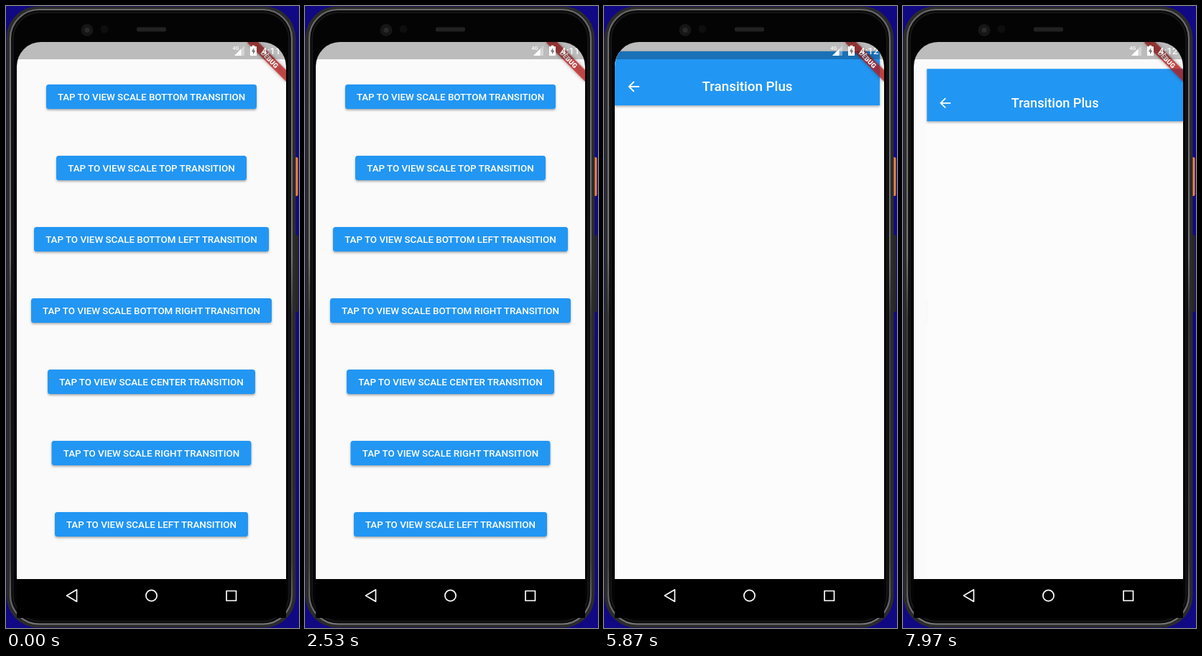
Recreate the animation shown at these times as an HTML page. Size 408 px wide and 864 px high, loop 8000 ms.

```html
<!DOCTYPE html>
<html lang="en">
<head>
<meta charset="utf-8">
<title>Scale transitions</title>
<style>
  html, body { margin: 0; width: 100%; height: 100%; overflow: hidden; background: #110884; }
  svg { display: block; width: 100vw; height: 100vh; }
  text { font-family: Roboto, sans-serif; font-weight: 500; fill: #fff; }
</style>
</head>
<body>
<svg viewBox="0 0 408 864" preserveAspectRatio="none">
  <defs>
    <clipPath id="screen"><path d="M15 796V84A34 34 0 0 1 49 50H356A34 34 0 0 1 390 84V796Z"/></clipPath>
    <linearGradient id="rim" x2="0" y2="1">
      <stop offset="0" stop-color="#6a6a6a"/>
      <stop offset=".4" stop-color="#747474"/>
      <stop offset=".5" stop-color="#3c3c3c"/>
      <stop offset=".9" stop-color="#444"/>
      <stop offset="1" stop-color="#777"/>
    </linearGradient>
    <filter id="shade" x="-10%" y="-30%" width="120%" height="180%">
      <feDropShadow dx="0" dy="1.8" stdDeviation="1.4" flood-color="#000" flood-opacity=".32"/>
    </filter>
    <filter id="glow" x="-20%" y="-80%" width="140%" height="260%">
      <feDropShadow dx="0" dy="0" stdDeviation="2.4" flood-color="#000" flood-opacity=".45"/>
    </filter>
  </defs>

  <!-- phone body -->
  <rect width="408" height="864" fill="#110884"/>
  <rect x="400" y="318" width="7" height="107" rx="2" fill="#262626"/>
  <rect x="400" y="210" width="6.5" height="54" rx="2" fill="#ee8540"/>
  <rect x=".5" y=".5" width="403" height="863" rx="44" fill="#2b2b2b"/>
  <rect x="6" y="5" width="392" height="853.5" rx="40" fill="#0b0b0b" stroke="url(#rim)" stroke-width="2.2"/>
  <rect x="10" y="9" width="384" height="845.5" rx="37" fill="#040404" stroke="#1a1a1a" stroke-width="1.5"/>
  <circle cx="113" cy="33.5" r="8.5" fill="#161616"/>
  <circle cx="113" cy="33.5" r="3.5" fill="#2a2a2a"/>
  <circle cx="137" cy="32" r="5.5" fill="#0e0e0e"/>
  <rect x="182" y="29.5" width="41" height="6" rx="2" fill="#222"/>
  <rect x="15" y="790" width="375" height="60" fill="#000"/>

  <g clip-path="url(#screen)">
    <rect x="15" y="50" width="375" height="746" fill="#fafafa"/>
    <g id="menu" font-size="13.37" text-anchor="middle"></g>

    <g id="page">
      <rect x="15" y="51" width="375" height="745" fill="#fcfcfc"/>
      <rect x="15" y="51" width="375" height="76.4" fill="#2196f3" filter="url(#shade)"/>
      <path d="M49.7 100.9H35.5M42.2 93.9L35.2 100.9L42.2 107.9" fill="none" stroke="#fff" stroke-width="1.9"/>
      <text x="202.5" y="107.5" font-size="19.1" text-anchor="middle">Transition Plus</text>
    </g>

    <g transform="translate(390 51) rotate(45)">
      <rect x="-38.2" y="26.7" width="76.4" height="11.5" fill="#b71c1c" fill-opacity=".72" filter="url(#glow)"/>
      <text y="35.8" font-size="9.4" text-anchor="middle" style="font-weight:900">DEBUG</text>
    </g>

    <!-- status bar -->
    <rect x="15" y="50" width="375" height="24" fill="#000" fill-opacity=".25"/>
    <text x="315.5" y="60.5" font-size="7">4G</text>
    <path d="M332 55V69H318Z" fill="#fff" fill-opacity=".35"/>
    <path d="M327.5 59.5V69H318Z" fill="#fff"/>
    <path d="M340 56.2H342.7V54.8H346.3V56.2H349V69H340Z" fill="#fff"/>
    <path d="M345.3 58L341.8 63.4H344V67.2L347.4 61.8H345.3Z" fill="#777"/>
    <text id="clock" x="382.5" y="67" font-size="13.4" text-anchor="end" fill-opacity=".9"></text>
  </g>

  <!-- navigation bar -->
  <g fill="none" stroke="#fff" stroke-width="1.7" stroke-linejoin="round">
    <path d="M84.5 819L98.5 810.8V827.2Z"/>
    <circle cx="202.5" cy="819" r="7.6"/>
    <rect x="307" y="812.5" width="13.5" height="13.5"/>
  </g>
</svg>
<script>
const LOOP = 8000, OPEN_MS = 1000, CLOSE_MS = 200, CLOCK_TICK = 3600;
const byId = id => document.getElementById(id);
const page = byId('page'), clock = byId('clock');

const buttons = [['BOTTOM', 293], ['TOP', 265], ['BOTTOM LEFT', 327], ['BOTTOM RIGHT', 335],
  ['CENTER', 289], ['RIGHT', 278], ['LEFT', 269]];
byId('menu').innerHTML = buttons.map(([name, w], i) => {
  const y = 109 + 99 * i;
  return `<rect x="${202.5 - w / 2}" y="${y}" width="${w}" height="34" rx="3.5" fill="#2196f3" filter="url(#shade)"/>
    <text x="202.5" y="${y + 22}">TAP TO VIEW SCALE ${name} TRANSITION</text>`;
}).join('');

// Each visit grows the page from an anchor, then shrinks it back.
const visits = [
  { open: 1046, close: 2190, x: 202.5, y: 796 },
  { open: 3240, close: 4330, x: 202.5, y: 51 },
  { open: 5409, close: 6430, x: 15, y: 796 },
  { open: 7652, close: 9000, x: 390, y: 796 }
];

const bezier = (x1, y1, x2, y2) => x => {
  if (x <= 0 || x >= 1) return Math.min(1, Math.max(0, x));
  const at = (a, b, s) => 3 * s * (1 - s) ** 2 * a + 3 * s * s * (1 - s) * b + s ** 3;
  let lo = 0, hi = 1;
  for (let i = 0; i < 24; i++) {
    const mid = (lo + hi) / 2;
    if (at(x1, x2, mid) < x) lo = mid; else hi = mid;
  }
  return at(y1, y2, lo);
};
const grow = bezier(0.18, 1, 0.04, 1);
const shrink = bezier(0.4, 0, 0.2, 1);

function draw(t) {
  const v = visits.find(v => t >= v.open && t < v.close + CLOSE_MS);
  const scale = !v ? 0
    : t < v.close ? grow((t - v.open) / OPEN_MS)
    : shrink(1 - (t - v.close) / CLOSE_MS);
  page.setAttribute('visibility', scale > 0.001 ? 'visible' : 'hidden');
  if (v) page.setAttribute('transform',
    `translate(${v.x} ${v.y}) scale(${scale}) translate(${-v.x} ${-v.y})`);
  clock.textContent = t < CLOCK_TICK ? '4:11' : '4:12';
}

const start = performance.now();
function tick() {
  draw((performance.now() - start) % LOOP);
  requestAnimationFrame(tick);
}
tick();
</script>
</body>
</html>
```
